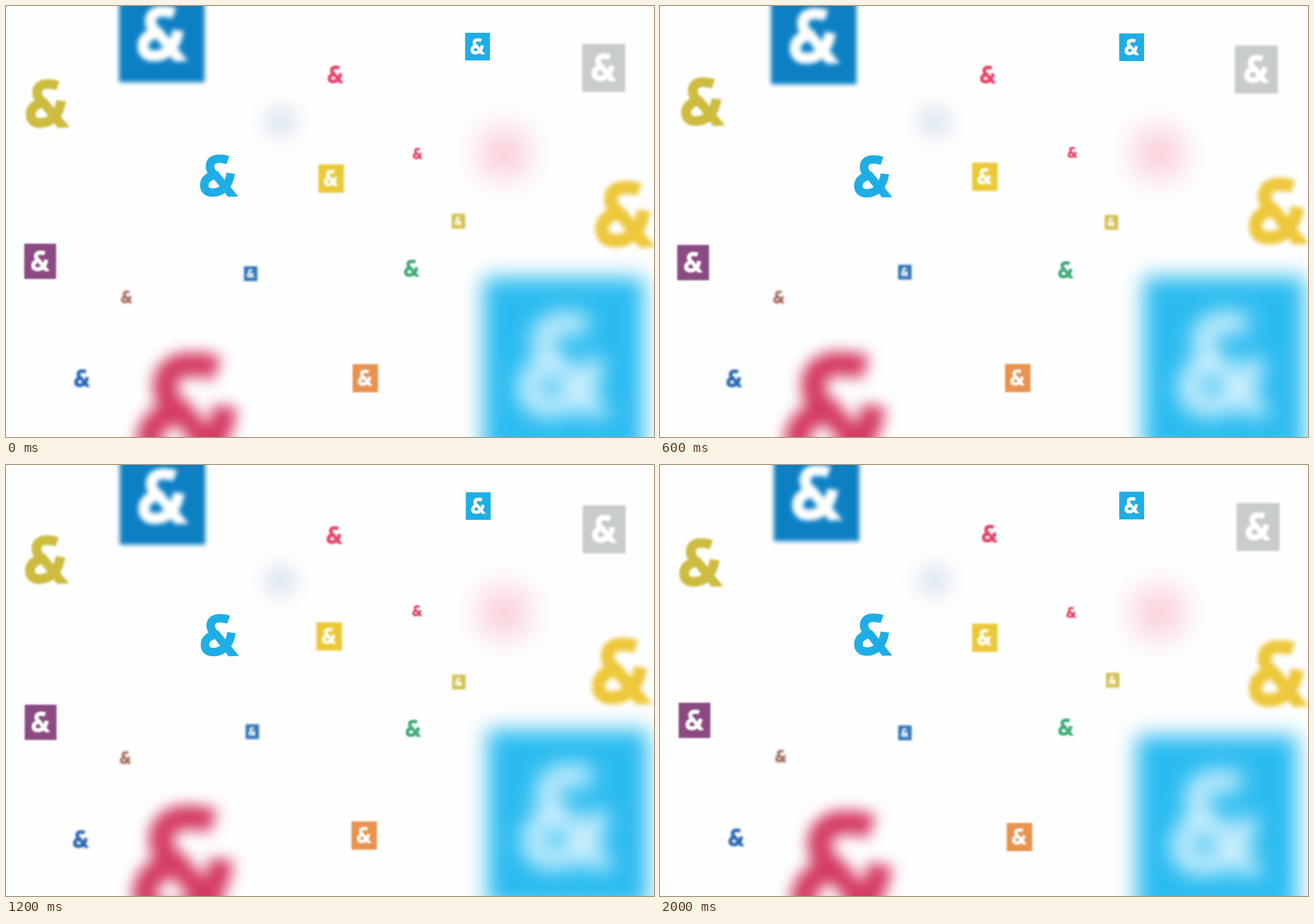
An HTML page that plays this animation: 917x611 px, repeating every 2.1 s.

```html
<!DOCTYPE html>
<html lang="en">
<head>
<meta charset="utf-8">
<title>Floating ampersands</title>
<style>
html, body { margin: 0; width: 100%; height: 100%; overflow: hidden; background: #fefefe; }
svg { display: block; width: 917px; height: 611px; }
</style>
</head>
<body>
<svg id="stage" viewBox="0 0 917 611">
  <defs>
    <!-- ampersand, 54 x 60, centred on the origin -->
    <g id="amp" transform="translate(-27 -30)">
      <g fill="none" stroke="currentColor" stroke-width="12">
        <path d="M39.5 8C35 6.4 31 6 27 6C18 6 14 10.5 14 16.5C14 22 17 26 22 31"/>
        <path d="M20 29C10 32 6 37 6 43.5C6 51 11 54 18 54C31 54 41 44 43.5 26.5"/>
      </g>
      <path d="M14 28L24.5 23L54 59.5L39.5 60Z" fill="currentColor"/>
    </g>
  </defs>
  <circle cx="388.5" cy="164" r="22" fill="#d9e3ee" style="filter:blur(14px)"/>
  <circle cx="705" cy="209" r="38" fill="#fad0da" style="filter:blur(20px)"/>
</svg>
<script>
const PERIOD = 2100, STEP = 100;
const stage = document.getElementById("stage");
const items = [];

function group(parent, html = "") {
  const el = document.createElementNS("http://www.w3.org/2000/svg", "g");
  el.innerHTML = html;
  return parent.appendChild(el);
}

// phase is in eighths of a turn, spin is the direction of the drift
const mark = (color, scale, x, y, phase, spin = 1) =>
  ({ body: `<use href="#amp" color="${color}"/>`, scale, x, y, phase, spin });

const tile = (color, scale, x, y, phase, spin = 1, ink = "#fff") => ({
  ...mark(color, scale, x, y, phase, spin),
  body: `<rect x="-44" y="-49" width="88" height="98" fill="${color}"/>
    <use href="#amp" color="${ink}" transform="translate(1 -1) scale(.96)"/>`
});

// Items of one layer share a blur; large and blurred ones are near and drift further.
function layer(blur, ...list) {
  const parent = group(stage);
  if (blur) parent.style.filter = `blur(${blur}px)`;
  for (const item of list) {
    item.el = group(parent, item.body);
    item.radius = .6 + 1.2 * (item.scale * blur) ** .4;
    items.push(item);
  }
}

layer(0,
  mark("#1eaee5", 1, 302, 241, 5),
  tile("#1eaee5", .4, 667.7, 58, 5));
layer(1,
  mark("#e8476a", .42, 465.5, 98, 7),
  mark("#e5405f", .26, 582.6, 207.8, 2),
  mark("#45ae7c", .41, 575.3, 372.8, 5),
  tile("#8c4a82", .51, 48.3, 363.4, 6),
  tile("#ea9350", .4, 507, 526.3, 7, -1));
layer(1.7,
  mark("#cdbc40", 1.15, 59, 136, 2),
  mark("#a2685a", .3, 169.8, 413.3, 7),
  mark("#2a69b2", .42, 106.7, 528.8, 7),
  tile("#c9cccd", .69, 845.6, 89.4, 6),
  tile("#ebc936", .4, 458.5, 243.1, 1),
  tile("#d2c04e", .21, 640, 306.2, 6),
  tile("#3577b9", .21, 347, 378.3, 5, -1));
layer(3,
  mark("#edc83c", 1.58, 874.5, 293, 1),
  tile("#0d80c4", 1.375, 220.3, 43.2, 6));
layer(10,
  mark("#d43a62", 2.9, 259, 574, 7, -1));
layer(15,
  tile("#2abbf0", 2.58, 793, 507, 3, 1, "#d2f1fd"));

function draw() {
  const t = Math.floor(performance.now() / STEP) * STEP % PERIOD;
  for (const { el, x, y, scale, radius, phase, spin } of items) {
    const angle = (t / PERIOD - phase / 8) * 2 * Math.PI;
    const px = x + radius * Math.cos(angle);
    const py = y - radius * spin * Math.sin(angle);
    el.setAttribute("transform", `translate(${px} ${py}) scale(${scale})`);
  }
  requestAnimationFrame(draw);
}
draw();
</script>
</body>
</html>
```
